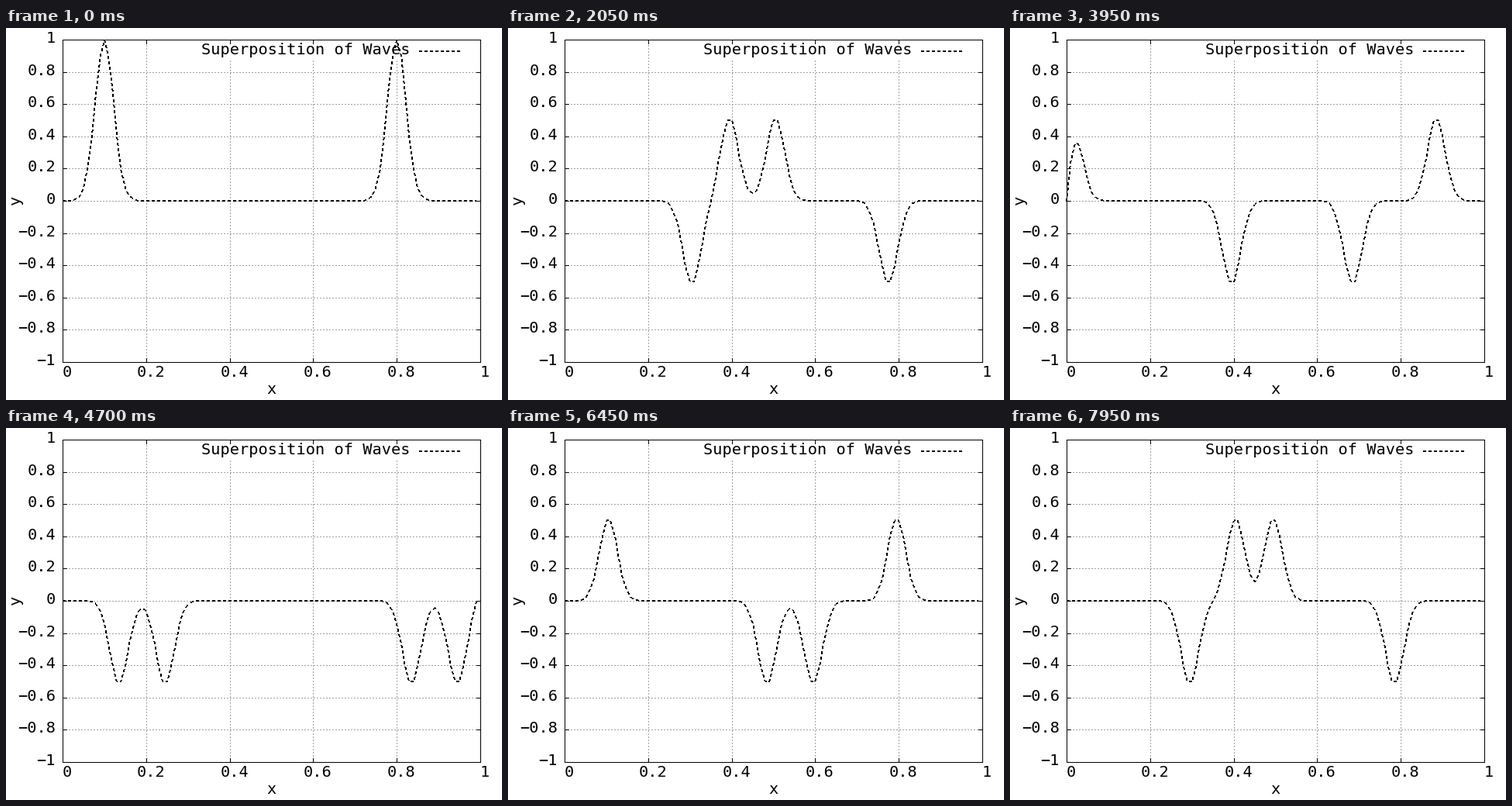
A matplotlib script for the animation above (8000 ms loop, 640x480 px).

```python
import numpy as np
import matplotlib.pyplot as plt
from matplotlib.animation import FuncAnimation

W, H, DPI = 640, 480, 100
PX = 72 / DPI                      # points per pixel
LEFT, RIGHT, TOP, BOTTOM = 73, 612, 15, 431
KEY_LEFT, KEY_BOTTOM = 255, 41
STEP_MS, FRAMES = 50, 160
CELLS = 100
GREY, BLACK = 160, 0
DASH, DOT = (4, 3), (2, 2)

plt.rcParams["font.family"] = "DejaVu Sans Mono"

fig = plt.figure(figsize=(W / DPI, H / DPI), dpi=DPI, facecolor="white")
ax = fig.add_axes([0, 0, 1, 1])
ax.axis("off")


def to_px(x, y):
    px = LEFT + np.asarray(x) * (RIGHT - LEFT)
    py = (TOP + BOTTOM) / 2 - np.asarray(y) * (BOTTOM - TOP) / 2
    return np.rint(px).astype(int), np.rint(py).astype(int)


def stroke(img, xs, ys, shade=BLACK, width=1, dash=None):
    """Draw a hard-edged polyline; the dash runs on through its corners."""
    count = 0
    for x0, y0, x1, y1 in zip(xs, ys, xs[1:], ys[1:]):
        dx, dy = x1 - x0, y1 - y0
        n = max(abs(dx), abs(dy))
        if n == 0:
            continue
        step = np.arange(n)
        if dash:
            step = step[(count + step) % sum(dash) < dash[0]]
        count += n
        px = np.rint(x0 + dx * step / n).astype(int)
        py = np.rint(y0 + dy * step / n).astype(int)
        steep = abs(dy) > abs(dx)
        for k in range(width):
            img[py - k * (not steep), px - k * steep] = shade


def label(x, y, text, ha="center", **kw):
    kw = {"va": "baseline", **kw}
    ax.text(x, y, text, size=20.25 * PX, ha=ha, zorder=4, **kw)


def number(v):
    return f"{v:.1f}".rstrip("0").rstrip(".").replace("-", "\u2212")


def draw_axes(img):
    ticks = [i / 5 for i in range(6)]
    levels = [i / 5 for i in range(-5, 6)]
    for v in ticks:
        x = int(to_px(v, 0)[0])
        top = KEY_BOTTOM if KEY_LEFT < x < RIGHT else TOP
        stroke(img, [x, x], [BOTTOM, top], GREY, dash=DOT)
        label(x + 6, 450, number(v))
    for v in levels:
        y = int(to_px(0, v)[1])
        stroke(img, [LEFT, RIGHT], [y, y], GREY, dash=DOT)
        label(64, y + 4, number(v), ha="right")
    for v in ticks:
        x = int(to_px(v, 0)[0])
        stroke(img, [x, x], [BOTTOM, BOTTOM - 6])
        stroke(img, [x, x], [TOP, TOP + 6])
    for v in levels:
        y = int(to_px(0, v)[1])
        stroke(img, [LEFT, LEFT + 6], [y, y])
        stroke(img, [RIGHT, RIGHT - 6], [y, y])
    stroke(img, [LEFT, RIGHT, RIGHT, LEFT, LEFT],
           [TOP, TOP, BOTTOM, BOTTOM, TOP])
    label(342, 472, "x")
    label(12.6, 222, "y", rotation=90, va="center")
    label(522, 34, "Superposition of Waves", ha="right")
    stroke(img, [533, 587], [30, 30], width=2, dash=DASH)


def solve_wave():
    """Leapfrog solution with unit Courant number and fixed ends."""
    x = np.arange(CELLS) / CELLS
    now = sum(np.exp(-1000 * (x - c) ** 2) for c in (0.1, 0.8))
    now[[0, -1]] = 0
    before = now.copy()
    states = [now]
    for _ in range(FRAMES - 2):
        after = np.zeros(CELLS)
        after[1:-1] = now[2:] + now[:-2] - before[1:-1]
        before, now = now, after
        states.append(now)
    return x, states


chart = np.full((H, W), 255, dtype=np.uint8)
draw_axes(chart)
grid_x, states = solve_wave()
picture = ax.imshow(chart, cmap="gray", vmin=0, vmax=255, aspect="auto",
                    extent=(0, W, H, 0), interpolation="nearest")
ax.set_xlim(0, W)
ax.set_ylim(H, 0)


def update(i):
    # the starting shape is held for two ticks
    img = chart.copy()
    stroke(img, *to_px(grid_x, states[max(0, i - 1)]), width=2, dash=DASH)
    picture.set_data(img)
    return (picture,)


anim = FuncAnimation(fig, update, frames=FRAMES, interval=STEP_MS,
                     repeat=True, repeat_delay=0, blit=False)
plt.show()
```
